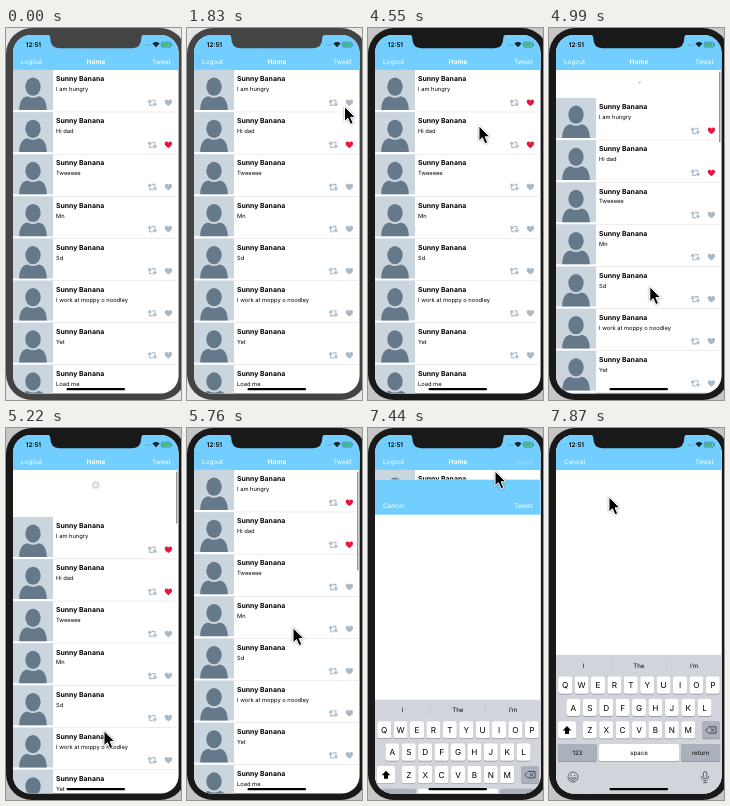
An HTML page that plays this animation: 175 px wide and 372 px high, repeating every 8 s.

```html
<!DOCTYPE html>
<html lang="en">
<head>
<meta charset="utf-8">
<title>Home feed</title>
<style>
html, body { margin: 0; width: 100%; height: 100%; overflow: hidden; }
svg { display: block; width: 100vw; height: 100vh; }
text { font-family: Inter, "Liberation Sans", sans-serif; text-rendering: geometricPrecision; }
.bar { font-size: 6.4px; fill: #fff; }
.title { font-size: 6.6px; font-weight: 700; fill: #fff; }
.name { font-size: 6.9px; font-weight: 700; }
.body { font-size: 5.75px; }
.key { font-size: 8.2px; }
.word { font-size: 6.1px; }
.clock { font-size: 6.4px; font-weight: 600; }
.mid { text-anchor: middle; }
.end { text-anchor: end; }
#cursor { filter: drop-shadow(0 .8px .8px #0006); }
</style>
</head>
<body>
<svg id="stage" viewBox="0 0 175 372"></svg>
<script>
const LOOP = 8000, FIRST = 510, STEP = 87.6;
const BLUE = '#71ceff', ICON = '#a9b9c6', RED = '#e6163f', SKIN = '#66798b', GREY = '#abb1bc';
const ROW = 42.1, TOP = 42.2, VIEW = 324;
const posts = ['I am hungry', 'Hi dad', 'Tweeeee', 'Mn', 'Sd',
  'I work at moppy o noodley', 'Yet', 'Load me'];

const text = (x, y, s, cls, extra = '') => `<text x="${x}" y="${y}" class="${cls}" ${extra}>${s}</text>`;
const rect = (x, y, w, h, fill, r = 0, extra = '') =>
  `<rect x="${x}" y="${y}" width="${w}" height="${h}" rx="${r}" fill="${fill}" ${extra}/>`;
const path = (d, extra) => `<path d="${d}" ${extra}/>`;
const line = (color, w) => `fill="none" stroke="${color}" stroke-width="${w}" stroke-linecap="round" stroke-linejoin="round"`;
const repeat = (n, f) => Array.from({ length: n }, (_, i) => f(i)).join('');

const heart = 'M0 3.3C-2 2-3.7 .5-3.7-1.3C-3.7-3.6-1-4 0-2C1-4 3.7-3.6 3.7-1.3C3.7 .5 2 2 0 3.3Z';
const arrow = 'M-4.1-1L-2.6-2.8L-1.1-1M-2.6-2.6V2.6H.3';
const repost = [0, 180].map(a => path(arrow, `transform="translate(146.3 32.6) rotate(${a})" ${line(ICON, 1.1)}`)).join('');

const avatar = rect(7, -.2, 40, 40, '#cbd5dd') +
  path('M13.2 39.8C13.2 32 16 26.5 21.5 26Q27 29 32.5 26C38 26.5 40.8 32 40.8 39.8Z', `fill="${SKIN}"`) +
  `<ellipse cx="27" cy="16.5" rx="7.7" ry="9.1" fill="${SKIN}"/>`;

const post = (s, i) => `<g transform="translate(0 ${i * ROW})">` + avatar +
  text(50, 11.1, 'Sunny Banana', 'name') + text(50, 21, s, 'body') + repost +
  path(heart, `transform="translate(162.4 32.6)" class="heart" fill="${i === 1 ? RED : ICON}"`) +
  rect(47, 41.6, 126, .4, '#d4d4d6') + '</g>';

function key(cx, y, w, label, cls = 'key', fill = '#fff') {
  return rect(cx - w / 2, y + .5, w, 17.4, '#8b8e94', 2) + rect(cx - w / 2, y, w, 17.2, fill, 2) +
    text(cx, y + (cls === 'key' ? 11.6 : 10.8), label, cls + ' mid');
}
const keyRow = (letters, i) => [...letters].map((c, n) =>
  key(90 + (n - (letters.length - 1) / 2) * 16.4, 248.5 + i * 22.4, 14, c)).join('');

const keyboard = rect(7, 227, 166, 139, '#d1d4da') +
  ['I', 'The', 'I’m'].map((s, i) => text(34.5 + i * 55.3, 239.6, s, 'word mid')).join('') +
  rect(62, 232, .5, 10, '#b9bcc3') + rect(117, 232, .5, 10, '#b9bcc3') +
  ['QWERTYUIOP', 'ASDFGHJKL', 'ZXCVBNM'].map(keyRow).join('') +
  key(18, 293.3, 18, '') + key(162, 293.3, 18, '', 'word', GREY) +
  key(28.4, 316, 39, '123', 'word', GREY) + key(90, 316, 80, 'space', 'word') +
  key(151.6, 316, 39, 'return', 'word', GREY) +
  path('M18 298L22.3 302.5H20V306H16V302.5H13.7Z', 'fill="#000"') +
  path('M157 302L160 298.8H167V305.2H160ZM162 300.6L165 303.5M165 300.6L162 303.5', line('#222', .7)) +
  '<circle cx="24" cy="349" r="5" fill="none" stroke="#50555c" stroke-width=".9"/>' +
  path('M21 350.3Q24 354.5 27 350.3ZM22.2 347V347.6M25.8 347V347.6', line('#50555c', .9)) +
  rect(154.4, 343.5, 3.4, 7, 'none', 1.7, 'stroke="#50555c" stroke-width=".9"') +
  path('M152.4 348.5Q152.6 352.4 156.1 352.4T159.8 348.5M156.1 352.4V354.6M154.2 354.6H158', line('#50555c', .8));

const spokes = repeat(12, i =>
  path('M0-1.9V-3.7', `class="spoke" transform="rotate(${i * 30})" ${line('#8e9299', .7)}`));

const status = text(19.7, 19.2, '12:51', 'clock') +
  repeat(4, i => `<circle cx="${139.5 + i * 1.8}" cy="17" r=".6" fill="#4a8db3"/>`) +
  path('M150 19.2L146.4 15.4Q150 12.6 153.6 15.4Z', 'fill="#10222c"') +
  rect(155.4, 14.2, 9.2, 4.9, 'none', 1.2, 'stroke="#2c6079" stroke-width=".6"') +
  rect(156.2, 15, 7, 3.3, '#35c65a', .6) + rect(165.1, 15.8, .7, 1.7, '#2c6079', .3);

const header = (left, id) => rect(7, 7, 166, 35, BLUE) +
  text(15, 35.7, left, 'bar') + text(164.5, 35.7, 'Tweet', 'bar end', `id="${id}"`);

document.getElementById('stage').innerHTML = `
<clipPath id="screen"><rect x="7" y="7" width="165.6" height="358.5" rx="18"/></clipPath>
<rect id="desk" width="175" height="372"/>
<rect id="bezel" width="180" height="372" rx="26"/>
<g clip-path="url(#screen)">
  ${rect(7, 7, 166, 359, '#fff')}
  <g id="list">${posts.map(post).join('')}</g>
  <g id="spin">${spokes}</g>
  <rect id="thumb" x="170.1" y="43.6" width="1.3" rx=".6" fill="#8c8c8c"/>
  ${header('Logout', 'tweet')}${text(90, 35.7, 'Home', 'title mid')}
  <g id="sheet">${rect(7, 7, 166, 359, '#fff')}${header('Cancel', 'send')}${keyboard}</g>
  ${status}
  ${rect(60.5, 360.1, 58.5, 2.1, '#000', 1)}
</g>
<path id="notch" d="M41.5 6.5Q44.3 7 44.3 10Q44.3 20.2 53.5 20.2H126Q135.3 20.2 135.3 10Q135.3 7 138 6.5Z"/>
<path id="cursor" d="M0 0V15L3.4 11.8L6 17.8L8.7 16.6L6.1 10.8H10.8Z" fill="#000" stroke="#fff" stroke-width="1" stroke-linejoin="round"/>`;

const $ = id => document.getElementById(id);
const set = (id, name, value) => $(id).setAttribute(name, value);
const firstHeart = document.querySelector('.heart');
const ticks = document.querySelectorAll('.spoke');

const ramp = (t, a, b) => Math.min(1, Math.max(0, (t - a) / (b - a)));
const ease = p => p * p * (3 - 2 * p);

// pointer moves: start, end, x, y
const start = [106, 293];
const moves = [
  [510, 685, 98, 243], [862, 1740, 157, 80], [1740, 2000, 159, 74],
  [4200, 4375, 109, 63], [4460, 4535, 111, 98], [4540, 5165, 98, 303],
  [5300, 5760, 106, 200], [5760, 5935, 123, 143], [6120, 6725, 158, 31], [7170, 7865, 60, 69]
];
const pointer = t => moves.reduce(([x, y], [a, b, tx, ty]) => {
  const p = ease(ramp(t, a, b));
  return [x + (tx - x) * p, y + (ty - y) * p];
}, start);

// elastic overscroll: grabbed at GRAB_Y, let go at RELEASE
const GRAB_Y = 203, RELEASE = 5250;
function pull(t, y) {
  if (t < 4540 || t > 5760) return 0;
  const drag = t < RELEASE ? Math.max(0, y - GRAB_Y) : 303 - GRAB_Y;
  return VIEW * (1 - 1 / (drag * .55 / VIEW + 1)) * (1 - ease(ramp(t, RELEASE, 5750)));
}

function draw(ms) {
  const t = FIRST + STEP * Math.floor((ms - FIRST + 12) / STEP);
  const [x, y] = pointer(t), off = pull(t, y);

  set('cursor', 'transform', `translate(${x} ${y})`);
  set('cursor', 'visibility', t < FIRST ? 'hidden' : 'visible');

  const active = t > 2165;
  set('desk', 'fill', active ? '#c6c6c6' : '#e6e6e6');
  for (const id of ['bezel', 'notch']) set(id, 'fill', active ? '#191919' : '#444');

  const taps = [2345, 3305, 4090].filter(tap => t >= tap).length;
  firstHeart.setAttribute('fill', taps % 2 ? RED : ICON);

  set('list', 'transform', `translate(0 ${TOP + off})`);
  const busy = t > 5200 && off > 0;
  const shown = busy ? 12 : Math.round((off - 25) / 1.6);
  ticks.forEach((s, i) => s.setAttribute('opacity',
    i >= shown ? 0 : busy ? (.25 + i / 16) * Math.min(1, off / 24) : .7));
  set('spin', 'transform', `translate(89.8 57) rotate(${busy ? Math.floor(t / 83) * 30 : 0})`);

  set('thumb', 'height', 99 - off);
  set('thumb', 'opacity', ramp(t, 4800, 4880) * ramp(t, 5930, 5850));
  set('tweet', 'opacity', 1 - .7 * ramp(t, 6815, 6985));
  set('sheet', 'transform', `translate(0 ${359 * (1 - ramp(t, 7170, 7690)) ** 3})`);
}

function tick() {
  draw(performance.now() % LOOP);
  requestAnimationFrame(tick);
}
tick();
</script>
</body>
</html>
```
